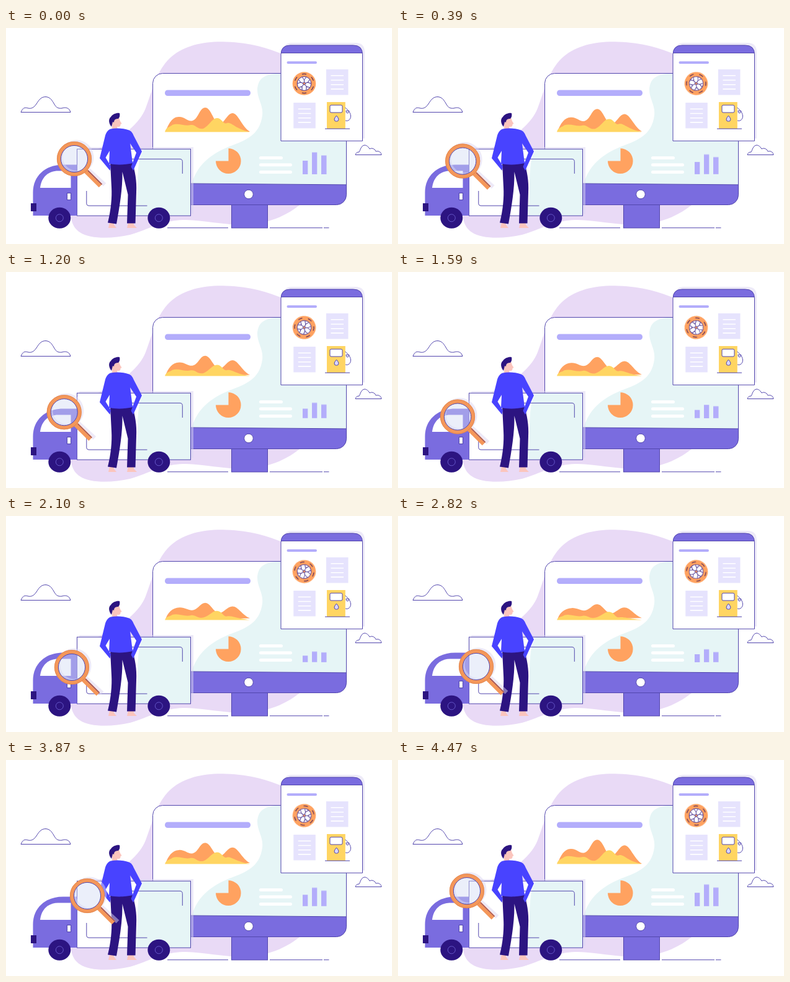
An HTML page without scripts that plays this animation: 622 by 350 pixels, repeating every 4.5 s.

```html
<!DOCTYPE html>
<html lang="en">
<head>
<meta charset="utf-8">
<title>Truck and dashboard</title>
<style>
  html, body { margin: 0; width: 100%; height: 100%; overflow: hidden; background: #fff; }
  svg { display: block; width: 100vw; height: 100vh; }
  .purple { fill: #7a6cdf; }
  .lilac { fill: #b3adfb; }
  .pale { fill: #e6e3fd; }
  .teal { fill: #e6f5f6; }
  .orange { fill: #ffa260; }
  .yellow { fill: #ffd562; }
  .ink { fill: #2c1481; }
  .skin { fill: #fbc5bd; }
  .blue { fill: #4843ff; }
  .white { fill: #fff; }
  .shade { fill: #dcd5f1; opacity: .5; }
  .line { stroke: #5145ad; stroke-width: 1; }
  .open { fill: none; }
  .rule { fill: none; stroke: #fff; stroke-width: 1.6; }
  .bar { transform-origin: 0 237px; animation: shrink 4.5s linear infinite; }
  .late { animation-name: shrink-late; }
  .spin { transform-origin: 480.5px 90px; animation: spin 4.5s linear infinite; }
  @keyframes shrink { 50% { transform: scaleY(.45); } }
  @keyframes shrink-late { 54.7% { transform: scaleY(.44); } }
  @keyframes spin { to { transform: rotate(360deg); } }
</style>
</head>
<body>
<svg viewBox="0 0 622 350">
  <defs>
    <path id="card" d="M443 183V43Q443 28 458 28H559.500Q574.500 28 574.500 43V183Z"/>
    <clipPath id="cardClip"><use href="#card"/></clipPath>
    <rect id="screen" x="236.500" y="73.500" width="312" height="213" rx="16"/>
    <clipPath id="screenClip"><use href="#screen"/></clipPath>
    <g id="doc">
      <rect class="pale" width="35.500" height="41.500"/>
      <path class="rule" d="M7.500 10.300h20.500m-20.500 7.200h20.500m-20.500 7.200h20.500m-20.500 7.200h20.500"/>
    </g>
    <g id="wheel">
      <ellipse class="ink" rx="18" ry="17"/>
      <circle class="open" r="6" stroke="#6557c9"/>
    </g>
    <g id="spoke">
      <path d="M0 -2.500V-6L-3 -10M0 -6L3 -10" fill="none" stroke="#2c1481" stroke-width=".9"/>
    </g>
    <path id="dash" d="M-3.500 -15.200Q0 -16 3.500 -15.200" fill="none" stroke="#5a2a55" stroke-width="1.300"/>
  </defs>

  <!-- Backdrop -->
  <path fill="#e9daf6" d="M148 196C190 176 215 155 225 130C238 95 243 68 266 47C290 26 325 21 355 22.500C395 24 420 32 450 44L500 150L500 265C470 290 450 309 405 317C370 323 325 312 290 311C250 311 230 327 200 335C170 342 135 342 119 331C107 323 104 311 103 290Z"/>
  <g class="line open">
    <path d="M24 136.500H104C102 129 96 128 90 130C82 131 80 127 77 122C73 115 70 112 64 111.500C56 111.500 53 117 49 123C45 129 41 131 36 130C29 128 27 130 24 136.500Z"/>
    <path d="M563 205.500H605C604 200 600 199 596 200C594 195 589 194 586 196C583 191 580 189.500 577 190C572 191 571 198 569 201C566 201 564 202 563 205.500Z"/>
    <path d="M260 323.800H358M425 323.800H510M512 323.800H520.500"/>
  </g>

  <!-- Monitor -->
  <rect class="purple line" x="363.500" y="286" width="58" height="38"/>
  <use href="#screen" class="white"/>
  <g clip-path="url(#screenClip)">
    <path class="teal" d="M446 73C418 74 406 80 405 100C405 115 415 125 413 142C409 170 392 180 365 190C330 203 307 222 298 256H549V73Z"/>
    <path class="purple line" d="M230 251.500L555 254V292H230Z"/>
  </g>
  <use href="#screen" class="line open"/>
  <circle class="white line" cx="391" cy="269.500" r="7.300"/>
  <rect class="lilac" x="256" y="100.500" width="138" height="9.500" rx="4.500"/>

  <path class="orange" d="M257 168C262 155 268 144 278 144C288 143 293 153 301 150C310 147 312 129 321 129C331 129 335 155 344 156C352 154 357 138 365 138C374 138 380 160 393 168Z">
    <animate attributeName="d" dur="4.5s" repeatCount="indefinite" keyTimes="0;.6;1" values="
      M257 168C262 155 268 144 278 144C288 143 293 153 301 150C310 147 312 129 321 129C331 129 335 155 344 156C352 154 357 138 365 138C374 138 380 160 393 168Z;
      M257 168C259 158 268 150 280 149.500C289 149 296 155 303 153C311 150 314 144 321 144C329 144 335 158 344 158C351 157 357 149 365 149C374 149 381 161 393 165Z;
      M257 168C262 155 268 144 278 144C288 143 293 153 301 150C310 147 312 129 321 129C331 129 335 155 344 156C352 154 357 138 365 138C374 138 380 160 393 168Z"/>
  </path>
  <path class="yellow" d="M256 168.500C258 160 264 161 268 157C278 153 288 160 298 157C306 156 308 165 318 163C328 158 332 146 340 146C348 146 350 157 356 154C364 152 368 163 393 168.500Z">
    <animate attributeName="d" dur="4.5s" repeatCount="indefinite" keyTimes="0;.6;1" values="
      M256 168.500C258 160 264 161 268 157C278 153 288 160 298 157C306 156 308 165 318 163C328 158 332 146 340 146C348 146 350 157 356 154C364 152 368 163 393 168.500Z;
      M256 168.500C258 163 264 164 268 161C278 158 288 165 298 162C306 161 308 167 318 165C328 163 332 156 340 156C348 156 350 166 356 165C364 164 368 166 393 168.500Z;
      M256 168.500C258 160 264 161 268 157C278 153 288 160 298 157C306 156 308 165 318 163C328 158 332 146 340 146C348 146 350 157 356 154C364 152 368 163 393 168.500Z"/>
  </path>

  <path class="orange" d="M358.500 215.500V195A20.300 20.500 0 1 1 338 215.500Z"/>
  <path d="M410.500 210.500H443.500M410.500 221.800H458.500M410.500 233.500H458.500" stroke="#fff" stroke-width="5" stroke-linecap="round"/>
  <g class="lilac">
    <rect class="bar" x="478" y="215" width="8.300" height="22"/>
    <rect class="bar" x="493" y="201.500" width="8.300" height="35.500"/>
    <rect class="bar late" x="508" y="206.500" width="8.500" height="30.500"/>
  </g>

  <!-- Card -->
  <use href="#card" class="shade" x="3.500" y="-4"/>
  <use href="#card" class="white"/>
  <rect class="purple line" x="440" y="20" width="140" height="20.500" clip-path="url(#cardClip)"/>
  <use href="#card" class="line open"/>
  <rect class="lilac" x="452.500" y="54" width="48.500" height="4" rx="2"/>
  <use href="#doc" x="516" y="67"/>
  <use href="#doc" x="463.300" y="121"/>
  <g class="spin">
    <g transform="translate(480.500 90)">
      <circle class="orange" r="18.800"/>
      <circle class="white" r="11.300" stroke="#2c1481" stroke-width=".9"/>
      <circle r="2" class="orange" stroke="#2c1481" stroke-width=".9"/>
      <use href="#spoke"/><use href="#spoke" transform="rotate(72)"/><use href="#spoke" transform="rotate(144)"/>
      <use href="#spoke" transform="rotate(216)"/><use href="#spoke" transform="rotate(288)"/>
      <use href="#dash"/><use href="#dash" transform="rotate(60)"/><use href="#dash" transform="rotate(120)"/>
      <use href="#dash" transform="rotate(180)"/><use href="#dash" transform="rotate(240)"/><use href="#dash" transform="rotate(300)"/>
    </g>
  </g>
  <rect class="yellow" x="517" y="120" width="29.800" height="43"/>
  <g class="line">
    <path class="open" d="M514 163.300H554M547 150C552 152 556 147 555.500 142C555 138 552 133 546.500 129"/>
    <path class="white" d="M548 134L553 134.500L551 138L548.500 137Z"/>
    <rect class="white" x="522" y="125" width="20" height="12" rx="2"/>
    <path fill="#d9d6ff" d="M532.500 142Q529 146 529 148A3.500 3.300 0 0 0 536 148Q536 146 532.500 142Z"/>
  </g>

  <!-- Truck -->
  <rect class="shade" x="118" y="193" width="184" height="108"/>
  <rect class="white" x="114.500" y="196.200" width="183" height="108"/>
  <path class="teal" d="M222 196.500C207 220 216 255 208 304H297.500V196.500Z"/>
  <rect class="line open" x="114.500" y="196.200" width="183" height="108"/>
  <path class="line open" d="M200 212.300H280Q284.300 212.300 284.300 216.500V236M129.800 264V284Q129.800 288 134 288H227.500"/>
  <path class="purple" d="M43.500 304V266C43.500 241 62 221.500 92 221.500H114.500V304Z"/>
  <path class="white" d="M55 259C57 241 69 231.500 84 231.500H104.500V259Z"/>
  <rect class="white line" x="98.500" y="267.500" width="6" height="11"/>
  <rect class="ink" x="40" y="284" width="9" height="13"/>
  <use href="#wheel" x="86.300" y="307.800"/>
  <use href="#wheel" x="246.300" y="307.800"/>

  <!-- Person -->
  <path class="skin" d="M167 315L165 324H178L174 319V315ZM197 315L195 324H211L206 319V315Z"/>
  <path class="ink" d="M168 219L203 216C208 232 211 248 210 266L208.500 316.500H195L196.500 270L187.500 233C188 260 183 290 178 317.500L164 315.500C169 295 171 275 170 258Z"/>
  <path class="skin" d="M171 149L182 145L184 151L186.500 155L184.500 156C185 160 182 161 179 160L180 166H171Z"/>
  <path class="ink" d="M170 160C165 154 165 147 169 144C172 139 179 137 183 138C184 142 183 145 181 147C176 147 174 149 174 153L172 152Z"/>
  <path class="blue" d="M169 163.500C178 161.500 190 162.500 198 165.500C202 167 204 170 206 175L219 200L205 231L201.500 225L210 202L200 187L204 219C192 222 177 222 166 220L167 199L160.500 210L169 224L167.500 231L151 211L160 174C162 168 165 164.500 169 163.500Z"/>

  <!-- Magnifier -->
  <g>
    <animateTransform attributeName="transform" type="translate" dur="4.5s" repeatCount="indefinite"
      keyTimes="0;.12;.173;.24;.29;.353;.467;.544;.627;.727;.789;.86;.96;1"
      values="110 212;102 217;98 219.500;94 225;93.500 229;96 234.500;106 245;115 248.500;126 244;134 235;134.500 228;131 220;116 213;110 212"/>
    <path d="M3.500 -30.500a28 28 0 1 1 -.1 0ZM3.500 -25a22 22 0 1 0 .1 0Z" class="shade" fill-rule="evenodd"/>
    <path d="M23 18L49 42" stroke="#dcd5f1" stroke-width="7" opacity=".5"/>
    <circle r="22" fill="#d3dcf4" opacity=".45"/>
    <path d="M18 19L42.500 43.500" stroke="#f4975a" stroke-width="8"/>
    <path d="M22 19L44.500 41.500" stroke="#8a4a66" stroke-width="1.200"/>
    <circle class="open" r="24.800" stroke="#f4975a" stroke-width="6.400"/>
    <circle class="open" r="27.600" stroke="#dc8148" stroke-width=".8"/>
    <circle class="open" r="21.600" stroke="#5145ad" stroke-width="1"/>
  </g>
</svg>
</body>
</html>
```
